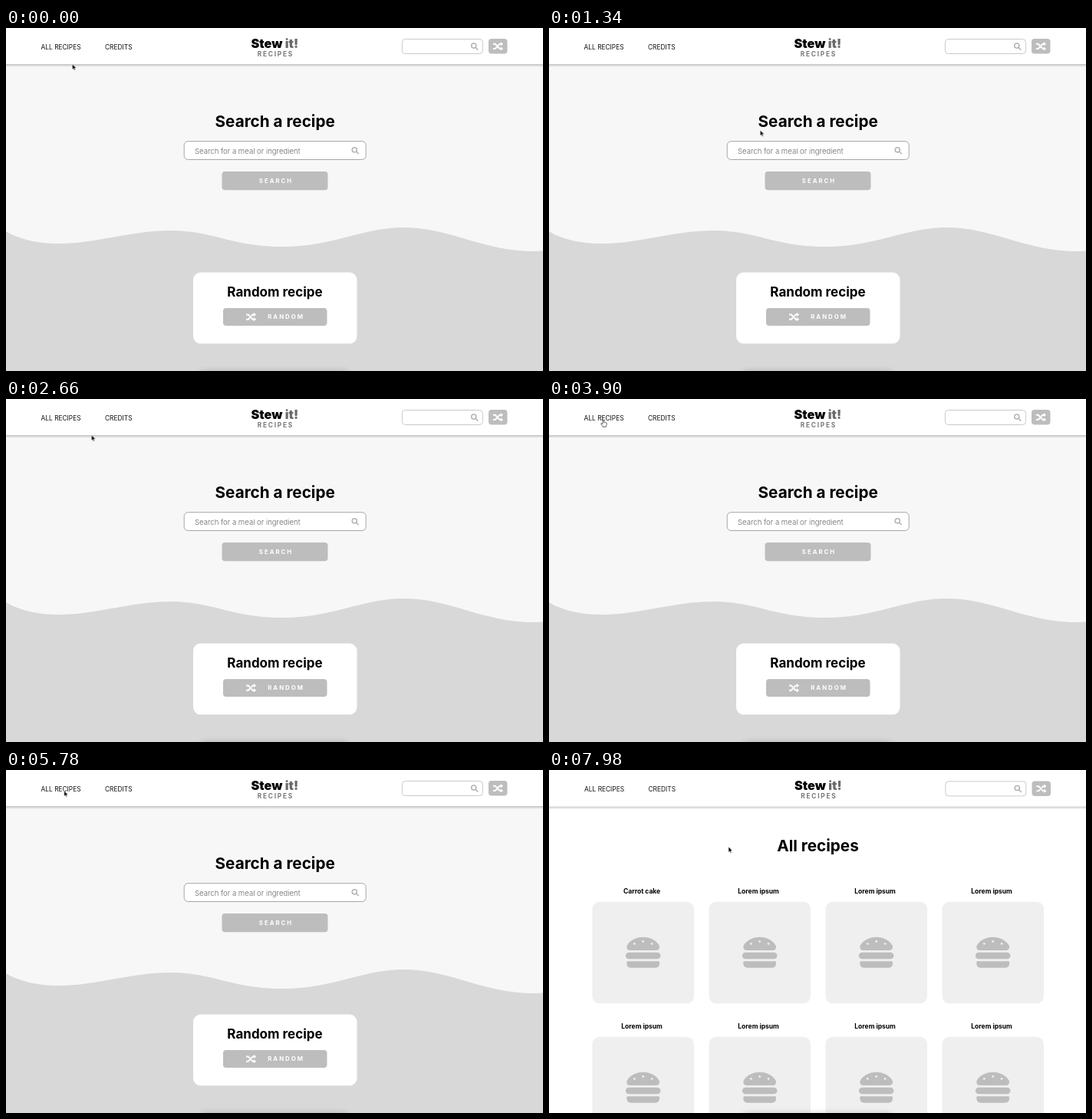
Recreate the animation shown at these times as an HTML page. Size 700 by 447 pixels, loop 8 s.

```html
<!DOCTYPE html>
<html lang="en">
<head>
<meta charset="utf-8">
<title>Recipes wireframe</title>
<style>
  html, body { margin: 0; width: 100%; height: 100%; overflow: hidden; background: #fff; }
  svg { display: block; width: 100%; height: 100%; }
  text { font-family: Inter, "Open Sans", sans-serif; font-weight: 700; }
  .mid { text-anchor: middle; }
  .nav { font-size: 8.35px; font-weight: 400; fill: #111; }
  .logo { font-size: 16.2px; font-weight: 900; }
  .sub { font-size: 8.3px; letter-spacing: 1.75px; fill: #777; }
  .h1 { font-size: 20.7px; }
  .h2 { font-size: 17px; }
  .hint { font-size: 9.6px; font-weight: 300; fill: #666; }
  .btn { font-size: 7.8px; letter-spacing: 2px; fill: #fff; }
  .name { font-size: 8.5px; }
  .grey { fill: #bdbdbd; }

  .home, .list, .head, .hand, .arrow, .ring { animation: 8s step-end infinite; }
  .home { animation-name: home; }
  .list { animation-name: list; }
  .head { animation-name: nudge; }
  .hand { animation-name: hand; }
  .arrow { animation-name: arrow; }
  .ring { animation-name: ring; }
  .cursor { animation: move 8s linear infinite; }

  @keyframes home { 0% { visibility: visible } 81.25%, 100% { visibility: hidden } }
  @keyframes list { 0% { visibility: hidden } 81.25%, 100% { visibility: visible } }
  @keyframes nudge { 0% { transform: none } 81.25%, 100% { transform: translate(.5px, .4px) } }
  @keyframes hand { 0% { visibility: hidden } 44.25% { visibility: visible } 72.25%, 100% { visibility: hidden } }
  @keyframes arrow { 0% { visibility: visible } 44.25% { visibility: hidden } 72.25%, 100% { visibility: visible } }
  @keyframes ring { 0% { visibility: hidden } 69.75% { visibility: visible } 71.25%, 100% { visibility: hidden } }
  @keyframes move {
    0% { transform: translate(86.5px, 47px) }
    6% { transform: translate(86.5px, 47px); animation-timing-function: ease-in-out }
    12.5% { transform: translate(453px, 234px); animation-timing-function: ease-in }
    16.75% { transform: translate(275.5px, 133.5px); animation-timing-function: ease-out }
    18.25% { transform: translate(265.5px, 110px); animation-timing-function: ease-in-out }
    22.5% { transform: translate(388px, 193px); animation-timing-function: ease-in }
    26.75% { transform: translate(289px, 126px); animation-timing-function: ease-out }
    33.25% { transform: translate(111.5px, 47px) }
    37.25% { transform: translate(97.5px, 42px); animation-timing-function: ease-out }
    44.25%, 45.75% { transform: translate(84.5px, 27px); animation-timing-function: ease-in-out }
    47% { transform: translate(88.5px, 27px); animation-timing-function: ease-in-out }
    48.75% { transform: translate(71px, 27px); animation-timing-function: ease-out }
    52% { transform: translate(58.7px, 27px); animation-timing-function: ease-in-out }
    56.25% { transform: translate(75px, 27px); animation-timing-function: ease-in-out }
    60.5% { transform: translate(58.7px, 27px); animation-timing-function: ease-in-out }
    66.25% { transform: translate(75.7px, 27px) }
    94.25% { transform: translate(75.7px, 27px); animation-timing-function: ease-in-out }
    99.75%, 100% { transform: translate(234px, 100px) }
  }
</style>
</head>
<body>
<svg viewBox="0 0 700 447">
  <defs>
    <linearGradient id="fade" x2="0" y2="1">
      <stop stop-opacity=".22"/>
      <stop offset="1" stop-opacity="0"/>
    </linearGradient>
    <filter id="blur" x="-20%" y="-80%" width="140%" height="260%">
      <feGaussianBlur stdDeviation="4"/>
    </filter>
    <g id="shuffle" transform="scale(.82)">
      <path d="M0 4.2H3.4L10.6 11.8H13M0 11.8H3.4L10.6 4.2H13" fill="none" stroke="#fff" stroke-width="2.4"/>
      <path d="M5.4 8.8L8 6.1M8 9.9L10.6 7.2" fill="none" stroke="#bdbdbd" stroke-width=".5"/>
      <path d="M12.5 1.8L15.5 4.2L12.5 6.7ZM12.5 9.3L15.5 11.8L12.5 14.2Z" fill="#fff" stroke="#fff" stroke-linejoin="round"/>
    </g>
    <g id="lens" fill="none" stroke="#b3b3b3" stroke-width="1.5" stroke-linecap="round">
      <circle cx="3.8" cy="3.8" r="3.1"/>
      <path d="M6.2 6.2L8.8 8.8"/>
    </g>
    <g id="burger" transform="scale(.089)">
      <path class="grey" d="M58.6 224H453.4C488 224 508 180 488.2 148.1C448 83.2 359.5 32 256 32S64 83.2 23.8 148.1C4 180 24 224 58.6 224Z"/>
      <rect class="grey" y="256" width="512" height="96" rx="48"/>
      <path class="grey" d="M32 384H480Q496 384 496 400V416Q496 480 432 480H80Q16 480 16 416V400Q16 384 32 384Z"/>
      <g fill="#efefef">
        <circle cx="128" cy="128" r="16"/>
        <circle cx="256" cy="96" r="16"/>
        <circle cx="384" cy="128" r="16"/>
      </g>
    </g>
    <g id="tile">
      <rect width="132.5" height="132.5" rx="9.5" fill="#efefef"/>
      <use href="#burger" x="0" transform="translate(43.4 43.2)"/>
    </g>
  </defs>

  <g class="home">
    <rect width="700" height="447" fill="#f7f7f7"/>
    <path fill="#d8d8d8" d="M0 265C20 277 45 281 68 281C120 281 160 264 215 264C270 264 295 285 361 285C425 285 465 260 517 260C580 260 620 291 690 291L700 290.5V447H0Z"/>
    <text class="h1 mid" x="350.7" y="129">Search a recipe</text>
    <rect x="232.2" y="147.7" width="237" height="23.8" rx="5" fill="#fff" stroke="#a6a6a6"/>
    <text class="hint" x="246" y="163.5">Search for a meal or ingredient</text>
    <use href="#lens" x="450.5" y="155"/>
    <rect class="grey" x="281.5" y="187" width="138" height="24.2" rx="4"/>
    <text class="btn mid" x="352" y="202">SEARCH</text>
    <rect x="244" y="318.6" width="213.5" height="92.6" rx="9.5" fill="#fff"/>
    <text class="h2 mid" x="350.5" y="349.8">Random recipe</text>
    <rect class="grey" x="283" y="365" width="135.5" height="23" rx="4"/>
    <use href="#shuffle" transform="translate(313 370)"/>
    <text class="btn" x="341.2" y="379.4">RANDOM</text>
  </g>

  <g class="list">
    <rect width="700" height="447" fill="#fff"/>
    <text class="h1 mid" x="350.5" y="106">All recipes</text>
    <g id="cards"></g>
  </g>

  <rect x="255" y="448" width="190" height="30" opacity=".22" filter="url(#blur)"/>

  <g class="head">
    <rect x="-1" y="47" width="702" height="4" fill="url(#fade)"/>
    <rect x="-1" y="-1" width="702" height="48" fill="#fff"/>
    <text class="nav" x="45.6" y="27.6">ALL RECIPES</text>
    <text class="nav" x="129" y="27.6">CREDITS</text>
    <text class="logo mid" x="350.3" y="26">Stew <tspan fill="#6b6b6b">it!</tspan></text>
    <text class="sub mid" x="351.4" y="36.8">RECIPES</text>
    <rect x="516.4" y="14.5" width="105" height="19" rx="4" fill="#fff" stroke="#cacaca"/>
    <use href="#lens" x="606" y="19.3"/>
    <rect class="grey" x="629" y="14" width="24.5" height="19.6" rx="4"/>
    <use href="#shuffle" transform="translate(634.9 17.3)"/>
  </g>

  <g class="cursor">
    <circle class="ring" cy=".5" r="15" fill="none" stroke="#000" stroke-opacity=".4" stroke-width="1.2"/>
    <path class="arrow" d="M0 0V7.2L1.6 5.8L2.7 8.3L3.9 7.8L2.8 5.3H5Z" fill="#000" stroke="#fff" stroke-width=".5"/>
    <path class="hand" d="M-.9 5V.9Q-.9 .1 -.1 .1T.7 .9V3.4Q1.3 3 2 3.5Q2.7 3.2 3.2 3.9Q4.2 3.6 4.2 4.8V6Q4.2 7.4 3.4 8.2V9.3H-.9V8.6L-3.1 5.7Q-3.5 4.8 -2.6 4.6Q-1.6 4.6 -.9 5.6Z" fill="#fff" stroke="#222" stroke-width=".7"/>
  </g>
</svg>
<script>
  let cards = "";
  for (let i = 0; i < 8; i++) {
    const x = 56.5 + (i % 4) * 152;
    const y = 171.8 + Math.floor(i / 4) * 176;
    cards += `<text class="name mid" x="${x + 64.6}" y="${y - 10.7}">${i ? "Lorem ipsum" : "Carrot cake"}</text>
      <use href="#tile" x="${x}" y="${y}"/>`;
  }
  document.getElementById("cards").innerHTML = cards;
</script>
</body>
</html>
```
